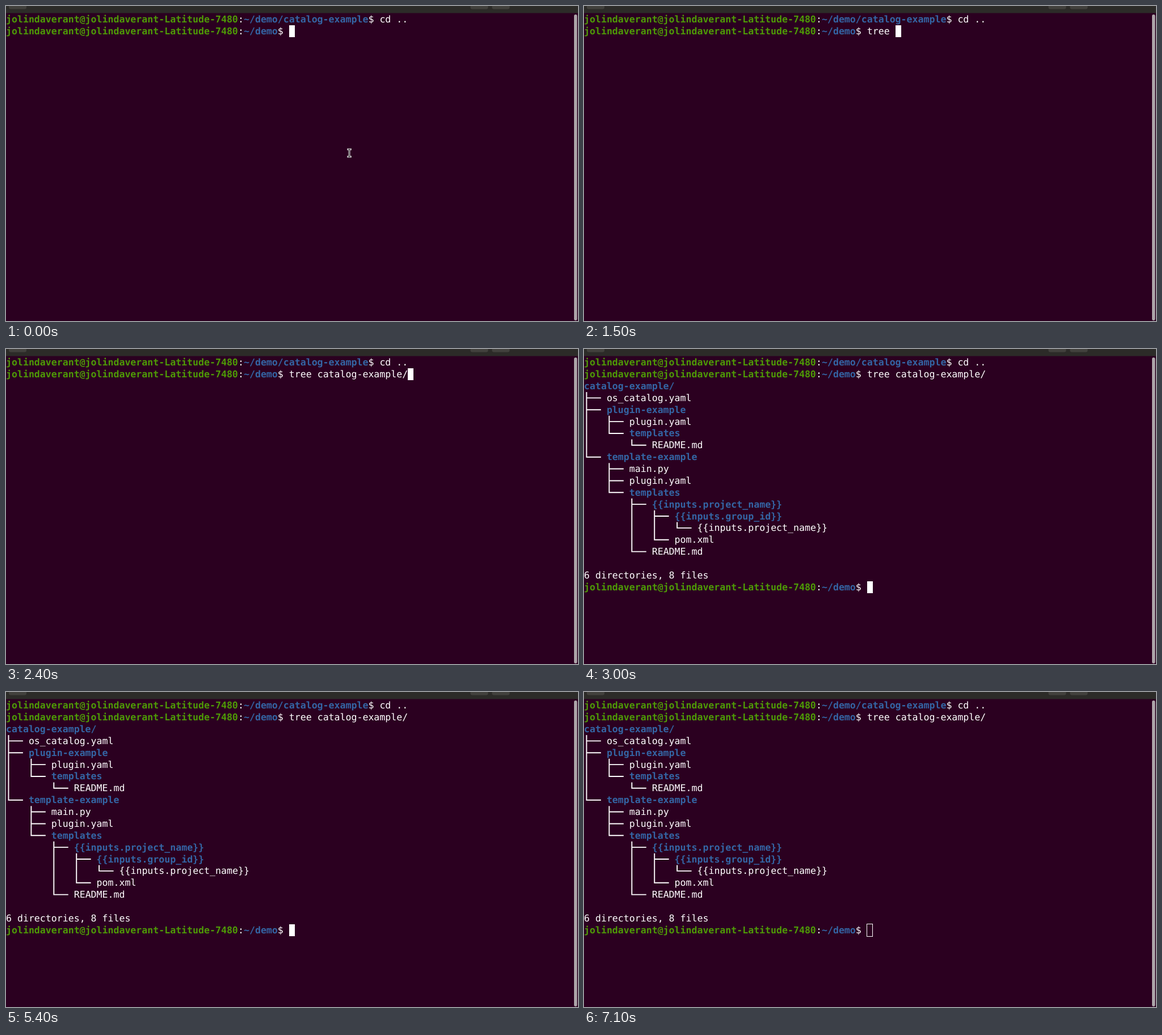
An HTML page that plays this animation: 1008x556 px, repeating every 7200 ms.

```html
<!DOCTYPE html>
<html lang="en">
<head>
<meta charset="utf-8">
<title>Terminal: tree</title>
<style>
  html, body { margin: 0; width: 100%; height: 100%; overflow: hidden; background: #2b0020; }
  svg { display: block; width: 1008px; height: 556px; }
  text {
    font: 16.57px "DejaVu Sans Mono", monospace;
    white-space: pre;
    text-rendering: geometricPrecision;
    fill: #fff;
  }
  .user, .dir { font-weight: bold; }
  .user { fill: #4e9a06; }
  .dir { fill: #3465a4; }
</style>
</head>
<body>
<svg id="stage" viewBox="0 0 1008 556" xmlns="http://www.w3.org/2000/svg">
  <rect width="1008" height="556" fill="#2b0020"/>
  <rect width="1008" height="12.5" fill="#2c2b28"/>
  <g fill="#42413d">
    <rect x="5" y="-10" width="31" height="15.5" rx="3"/>
    <rect x="818.5" y="-10" width="31" height="15.5" rx="3"/>
    <rect x="856.5" y="-10" width="31" height="15.5" rx="3"/>
  </g>
  <rect x="1001" y="15" width="5.5" height="540" rx="2.7" fill="#aca5a9"/>
</svg>
<script>
const LOOP = 7200;
const CELL = 9.976, ROW = 20.87, TOP = 13.33, BASE = 15.9;
const HOST = "jolindaverant@jolindaverant-Latitude-7480";
const PROMPT_COLS = HOST.length + ":~/demo$ ".length;
const COMMAND = "tree catalog-example/";
const LAST_ROW = 19;

// A trailing "*" marks a directory.
const TREE = [
  "catalog-example/*",
  "├── os_catalog.yaml",
  "├── plugin-example*",
  "│   ├── plugin.yaml",
  "│   └── templates*",
  "│       └── README.md",
  "└── template-example*",
  "    ├── main.py",
  "    ├── plugin.yaml",
  "    └── templates*",
  "        ├── {{inputs.project_name}}*",
  "        │   ├── {{inputs.group_id}}*",
  "        │   │   └── {{inputs.project_name}}",
  "        │   └── pom.xml",
  "        └── README.md",
  "",
  "6 directories, 8 files"
];

// [time, typed characters]
const KEYS = [[0, 0], [700, 1], [1000, 2], [1200, 3], [1300, 4],
  [1500, 5], [1800, 6], [2000, 7], [2400, COMMAND.length]];

// [from, to, x, y]
const POINTER = [[0, 700, 605, 259.5], [6000, 6100, 597, 196.5], [6700, 6800, 70, 13.5]];

const stage = document.getElementById("stage");

function add(parent, tag, attrs = {}) {
  const el = document.createElementNS("http://www.w3.org/2000/svg", tag);
  for (const key in attrs) el.setAttribute(key, attrs[key]);
  parent.appendChild(el);
  return el;
}

function print(parent, row, col, str, cls = "plain") {
  const el = add(parent, "text", { x: col * CELL, y: TOP + row * ROW + BASE, class: cls });
  el.textContent = str;
  return el;
}

function prompt(parent, row, path, command = "") {
  let col = 0;
  const put = (str, cls) => {
    print(parent, row, col, str, cls);
    col += str.length;
  };
  put(HOST, "user");
  put(":");
  put(path, "dir");
  put("$ " + command);
}

function branchPath(line, row) {
  const top = TOP + row * ROW, mid = top + 10.4;
  let d = "";
  [...line].forEach((ch, i) => {
    const x = i * CELL + 4.5;
    if (ch === "├" || ch === "│") d += `M${x} ${top}V${top + ROW + 0.1}`;
    if (ch === "└") d += `M${x} ${top}V${mid + 0.95}`;
    if (ch === "├" || ch === "└") d += `M${x} ${mid}H${(i + 3) * CELL}`;
  });
  return d;
}

prompt(stage, 0, "~/demo/catalog-example", "cd ..");
prompt(stage, 1, "~/demo");
const typed = print(stage, 1, PROMPT_COLS, "");

const output = add(stage, "g");
let branches = "";
TREE.forEach((line, i) => {
  const row = i + 2;
  const col = Math.max(0, line.search(/[^├└│─ ]/));
  branches += branchPath(line, row);
  print(output, row, col, line.slice(col).replace("*", ""), line.endsWith("*") ? "dir" : "plain");
});
add(output, "path", { d: branches, stroke: "#fff", "stroke-width": 1.9, fill: "none" });
prompt(output, LAST_ROW, "~/demo");

const block = add(stage, "rect", { width: 10, height: 21, fill: "#fff" });
const hollow = add(stage, "rect", {
  x: 498.5, y: 409.5, width: 10, height: 22, fill: "none", stroke: "#fff"
});

const pointer = add(stage, "g");
const beam = "M-2.2 -6.5H2.2M-2.2 6.5H2.2M0 -6.5V6.5";
add(pointer, "path", { d: beam, stroke: "#e4e2e3", "stroke-width": 3, "stroke-linecap": "square" });
add(pointer, "path", { d: beam, stroke: "#1c1a1b", "stroke-width": 1 });

function show(el, on) {
  el.setAttribute("visibility", on ? "visible" : "hidden");
}

function draw(t) {
  const done = t >= 3000;
  const count = KEYS.filter(([time]) => t >= time).pop()[1];
  typed.textContent = COMMAND.slice(0, count);
  show(output, done);

  const focused = t < 7100;
  const blinkOff = done
    ? t < 6600 && Math.floor((t - 3000) / 600) % 2 === 1
    : t >= 500 && t < 700;
  const col = PROMPT_COLS + (done ? 0 : count);
  block.setAttribute("x", Math.round(col * CELL));
  block.setAttribute("y", Math.round(TOP + (done ? LAST_ROW : 1) * ROW));
  show(block, focused && !blinkOff);
  show(hollow, !focused);

  const spot = POINTER.find(([from, to]) => t >= from && t < to);
  show(pointer, !!spot);
  if (spot) pointer.setAttribute("transform", `translate(${spot[2]} ${spot[3]})`);
}

const start = performance.now();
function tick() {
  draw((performance.now() - start) % LOOP);
  requestAnimationFrame(tick);
}
tick();
</script>
</body>
</html>
```
